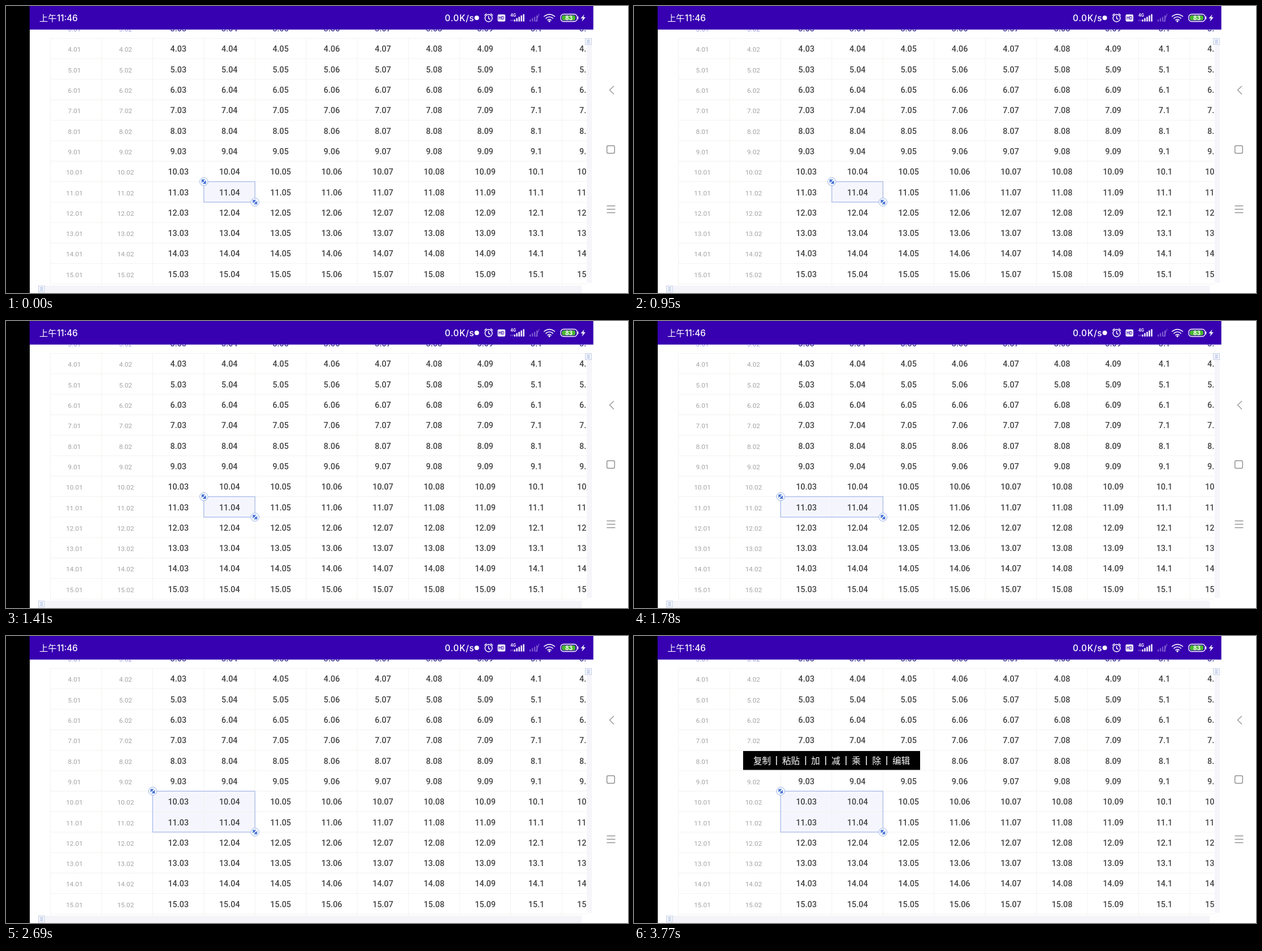
Animation, 1100 px wide and 509 px high, one loop 3820 ms. Source, as an HTML page:

```html
<!DOCTYPE html>
<html lang="zh">
<head>
<meta charset="utf-8">
<title>Table selection</title>
<style>
html, body { margin: 0; width: 100%; height: 100%; overflow: hidden; background: #fff; }
svg { display: block; width: 1100px; height: 509px; }
text { text-anchor: middle; }
.cell { font: 500 14.4px Roboto, sans-serif; fill: #454547; }
.fixed { font: 400 11.8px Roboto, sans-serif; fill: #a4a4a5; }
.head { fill: #3b3596; }
.head.fixed { fill: #8f8bdc; }
.status { font: 500 15.3px Inter, sans-serif; fill: #fff; text-anchor: start; }
.speed { letter-spacing: .7px; }
.cjk { font-family: "Noto Sans CJK SC", "Noto Sans CJK", sans-serif; font-weight: 400; }
.menu { font-size: 15.6px; fill: #fff; }
.tiny { font: 700 7px Inter, sans-serif; fill: #fff; }
</style>
</head>
<body>
<svg id="stage" viewBox="0 0 1100 509">
  <defs>
    <clipPath id="view"><rect x="42" y="42" width="985" height="453"/></clipPath>
    <g id="handle">
      <circle r="7.2" fill="#fff" stroke="#92aee6"/>
      <path d="M-4-4H2.4L-4 2.4ZM4 4H-2.4L4-2.4Z" fill="#4a76d6"/>
      <path d="M-2-2L2 2" stroke="#4a76d6" stroke-width="1.4"/>
    </g>
    <g id="thumb">
      <rect x="-5.5" y="-5.5" width="11" height="11" fill="#f4f6fc" stroke="#c6cfe4"/>
      <path d="M-2.5-2.5h5M-2.5 0h5M-2.5 2.5h5" stroke="#9aaed8"/>
    </g>
  </defs>

  <rect width="1100" height="509" fill="#fff"/>
  <rect x="1027" y="57" width="9" height="434" fill="#f5f5fa"/>
  <rect x="70" y="496" width="948" height="13" fill="#f4f4f9"/>
  <g clip-path="url(#view)">
    <rect id="fill" fill="#f5f6fd"/>
    <path id="grid" fill="none" stroke="#f2f2f1"/>
    <g id="cells"></g>
  </g>
  <use href="#thumb" x="1030" y="63"/>
  <use href="#thumb" x="63" y="502"/>
  <rect id="border" fill="none" stroke="#a3b6e8" stroke-width="1.2"/>
  <use id="start" href="#handle"/>
  <use id="end" href="#handle"/>

  <g id="menu">
    <rect x="193" y="204" width="313" height="33.5" fill="#000"/>
  </g>

  <rect width="42" height="509" fill="#000"/>
  <rect x="41.7" width="997" height="41.8" fill="#3700b0"/>
  <text class="status cjk" x="59" y="27">上午</text>
  <text class="status" x="90" y="27">11:46</text>
  <text class="status speed" x="776" y="27">0.0K/s</text>

  <g fill="none" stroke="#fff" stroke-width="1.5" stroke-linecap="round" stroke-linejoin="round">
    <circle cx="832.5" cy="21" r="4" fill="#fff" stroke="none"/>
    <circle cx="853.5" cy="21.5" r="6.4"/>
    <path d="M853.5 18v4l2.5 1.5M846.5 16.5l3-2.8M860.5 16.5l-3-2.8"/>
    <path d="M951.5 18.5q9.5-7.5 19 0M954.7 21.8q6.3-5 12.6 0M957.8 25q3.2-2.6 6.4 0"/>
    <circle cx="961" cy="27" r="1" fill="#fff"/>
    <rect x="981" y="14.5" width="29" height="13" rx="5" stroke-width="1.3"/>
  </g>
  <rect x="869.5" y="15" width="13.5" height="12.5" rx="2" fill="#fff"/>
  <text class="tiny" x="876.2" y="24" style="fill:#3700b0">HD</text>
  <text class="tiny" x="897" y="19">4G</text>
  <path d="M893 24v3M896 24v3" stroke="#9c84dc"/>
  <path id="bars" stroke="#fff" stroke-width="2.4"/>
  <path id="dim" stroke="#7d5bd0" stroke-width="2.2"/>
  <path d="M937 28l6-14" stroke="#7d5bd0" stroke-width="1.2"/>
  <rect x="983" y="16.5" width="24" height="9" rx="3.5" fill="#49b82f"/>
  <rect x="1010.6" y="18.5" width="1.6" height="5" fill="#fff"/>
  <text x="995.5" y="25" class="tiny" style="font-size:10px">83</text>
  <path d="M1022.5 15l-6 7h3.6l-1.6 5.5 6.3-7.4h-3.7z" fill="#fff"/>

  <g fill="none" stroke="#939393" stroke-width="1.3">
    <path d="M1075 142l-7.5 7 7.5 7.5"/>
    <rect x="1062.7" y="247.7" width="13.6" height="13.6" rx="2.5" stroke-width="1.5"/>
    <path d="M1062.5 354.5h15M1062.5 360.5h15M1062.5 366.5h15"/>
  </g>
</svg>
<script>
const $ = id => document.getElementById(id);
const colX = c => 78.5 + 90.45 * c;
const rowY = r => 57.4 + 36.3 * (r - 4);

function set(el, attrs) {
  for (const k in attrs) el.setAttribute(k, attrs[k]);
}
function add(parent, tag, attrs, label) {
  const el = document.createElementNS("http://www.w3.org/2000/svg", tag);
  set(el, attrs);
  if (label) el.textContent = label;
  parent.append(el);
}

// Table: the first two columns are smaller and grey.
let grid = "";
for (let r = 4; r <= 16; r++) grid += `M78 ${rowY(r)}H1027`;
for (let c = 0; c <= 10; c++) grid += `M${colX(c)} 57V495`;
set($("grid"), { d: grid });

for (let r = 3; r <= 15; r++) {
  for (let c = 0; c <= 10; c++) {
    const fixed = c < 2;
    add($("cells"), "text", {
      class: (fixed ? "fixed" : "cell") + (r === 3 ? " head" : ""),
      x: colX(c) + (fixed ? 42.5 : 45.4),
      y: rowY(r) + 24
    }, String(+(r + (c + 1) / 100).toFixed(2)));
  }
}

// Signal strength
const bars = (x, n) =>
  Array.from({ length: n }, (_, i) => `M${x + i * 4} 27.5v${-3.5 - i * 2.4}`).join("");
set($("bars"), { d: bars(899.5, 5) });
set($("dim"), { d: bars(927, 4) });

// Context menu
const items = [["复制", 226.5], ["粘贴", 277.5], ["加", 321], ["减", 357], ["乘", 393], ["除", 429], ["编辑", 472.5]];
for (const [label, x] of items) add($("menu"), "text", { class: "cjk menu", x, y: 226.8 }, label);
for (const x of [252, 303.5, 339, 375, 411, 447])
  add($("menu"), "path", { d: `M${x} 213v16`, stroke: "#fff", "stroke-width": 1.5 });

// Steps: time, first column, first row, menu shown
const LOOP = 3820;
const steps = [
  [0, 3, 11, false],
  [1530, 2, 11, false],
  [2240, 2, 10, false],
  [2900, 2, 10, true]
];
let shown;

function draw(t) {
  const step = steps.findLast(s => s[0] <= t);
  if (step === shown) return;
  shown = step;
  const [, col, row, menu] = step;
  const x = colX(col), y = rowY(row), x2 = colX(4), y2 = rowY(12);
  const box = { x, y, width: x2 - x, height: y2 - y };
  set($("fill"), box);
  set($("border"), box);
  set($("start"), { x, y });
  set($("end"), { x: x2, y: y2 });
  $("menu").style.display = menu ? "" : "none";
}

const begin = performance.now();
function tick() {
  draw((performance.now() - begin) % LOOP);
  requestAnimationFrame(tick);
}
tick();
</script>
</body>
</html>
```
